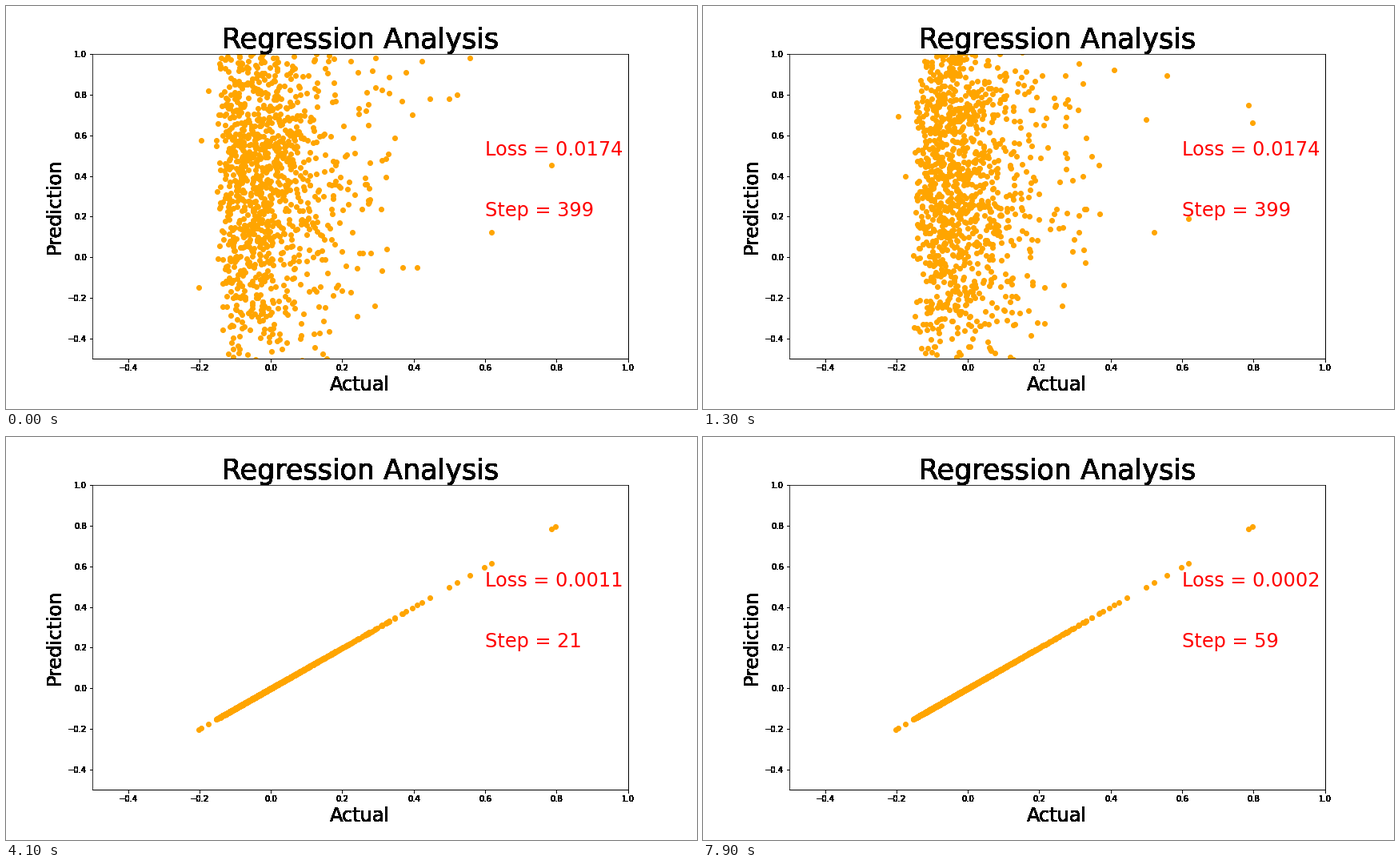
These frames come from a looping animation (864 px wide and 504 px high, 8000 ms). A matplotlib script:

```python
import numpy as np
import matplotlib.pyplot as plt
from matplotlib.animation import FuncAnimation

FRAMES, INTERVAL = 80, 100
SHUFFLE = 20          # frames of scattered predictions before training restarts

# Skewed bulk of samples plus the few isolated ones at both ends
EXTREMES = [-.202, -.196, -.176, .396, .41, .423, .446,
            .498, .521, .558, .598, .617, .785, .798]
rng = np.random.default_rng(7)
bulk = rng.gamma(2.5, .065, 1330) - .16
actual = np.concatenate([EXTREMES, bulk[bulk < .38]])


def scattered(i):
    return np.random.default_rng(100 + i).normal(.43, .5, actual.size)


def residual(step):
    """Signed root of the summed squared error: decay plus a small wobble."""
    decay = -.2862 * np.exp(-.1162 * (step - 4))
    return decay + .032 * np.cos(2 * np.pi * (step - 46) / 7.77)


plt.rcParams["font.family"] = "DejaVu Sans"
fig = plt.figure(figsize=(12, 7), dpi=72)
fig.subplots_adjust(left=.125, right=.9, bottom=.125, top=.88)
ax = fig.add_subplot()
ax.set(xlim=(-.5, 1), ylim=(-.5, 1))
ax.set_title("Regression Analysis", fontsize=35)
ax.set_xlabel("Actual", fontsize=24)
ax.set_ylabel("Prediction", fontsize=24)

# Overdraw the axes so the outer labels build up their heavy edges
fig.canvas.draw()
renderer = fig.canvas.get_renderer()
for _ in range(40):
    ax.draw(renderer)
fig.figimage(np.array(fig.canvas.buffer_rgba()), zorder=-1)

dots = ax.scatter([], [], color="orange")
loss_text = ax.text(.6, .5, "", fontsize=24, color="red")
step_text = ax.text(.6, .2, "", fontsize=24, color="red")


def update(i):
    if i < SHUFFLE:
        step, loss, y = 399, .0174, scattered(i)
    else:
        step = i - SHUFFLE
        r = residual(step)
        loss = r ** 2
        y = actual + r / 33 * (1 + .8 * actual)
    dots.set_offsets(np.column_stack([actual, y]))
    loss_text.set_text(f"Loss = {loss:.4f}")
    step_text.set_text(f"Step = {step}")
    return dots, loss_text, step_text


anim = FuncAnimation(fig, update, frames=FRAMES, interval=INTERVAL,
                     repeat=True, repeat_delay=0)
plt.show()
```
